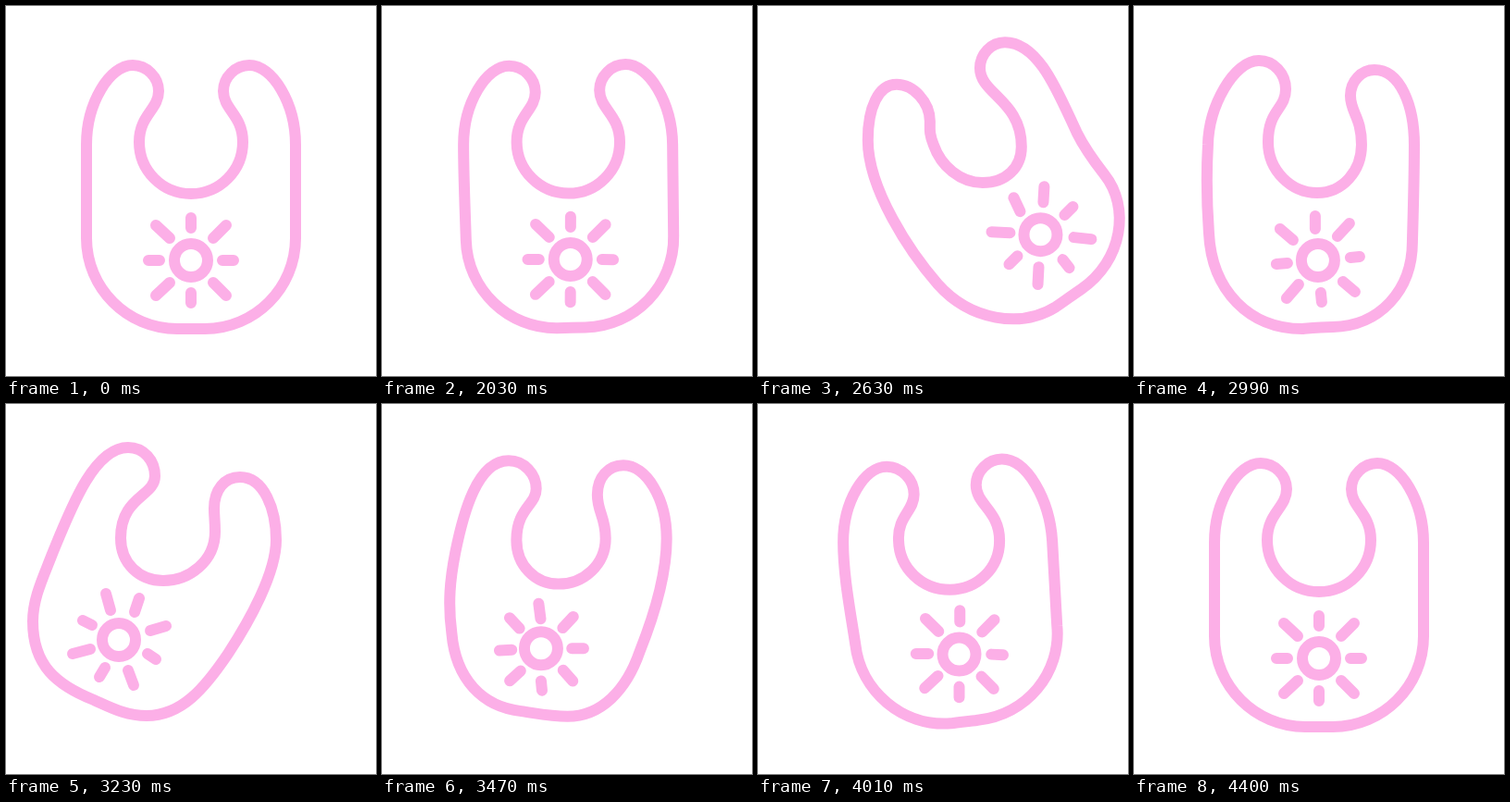
An HTML page without scripts that plays this animation: 400x400 px, repeating every 4430 ms.

```html
<!DOCTYPE html>
<html lang="en">
<head>
<meta charset="utf-8">
<title>Swinging bib</title>
<style>
  html, body { margin: 0; width: 100%; height: 100%; overflow: hidden; background: #fff; }
  svg { display: block; width: 100%; height: 100%; }

  :root {
    --ease-in: cubic-bezier(.47, 0, .745, .715);
    --ease-out: cubic-bezier(.39, .575, .565, 1);
    --ease-both: cubic-bezier(.37, 0, .63, 1);
  }

  .bib {
    fill: none;
    stroke: #fcafe7;
    stroke-width: 12;
    stroke-linecap: round;
    stroke-linejoin: round;
    animation: swing 4430ms infinite;
  }

  /* Each pose: bib outline, sun ring, then eight rays clockwise from the top. */
  @keyframes swing {
    0%, 45.1%, 99.3%, 100% { /* rest */
      animation-timing-function: var(--ease-both);
      d: path("M87,150C87,105 112,64 137,64C152,64 165,77 165,92C165,112 144,118 144,147\
C144,178 169,203 200,203C231,203 256,178 256,147C256,118 235,112 235,92\
C235,77 248,64 263,64C288,64 313,105 313,150C313,183 313,217 313,251\
C313,305 269,349 215,349C205,349 195,349 185,349C131,349 87,305 87,251C87,217 87,183 87,150Z\
M182,275a18,18 0 1 0 36,0a18,18 0 1 0 -36,0Z\
M200,229L200,240M238,237L224,251M246,275L234,275M238,313L224,299\
M200,321L200,310M162,313L177,299M154,275L166,275M162,237L177,251");
    }
    59.3% { /* far right */
      animation-timing-function: var(--ease-in);
      d: path("M119,145C119,110 130,85 150,85C168,85 186,104 186,125C186,133 185,138 190,150\
C198,173 219,191 243,191C268,191 285,175 285,152C285,102 240,95 240,67\
C240,52 252,39 267,39C304,39 325,95 345,137C354,155 364,168 375,182\
C403,217 395,275 350,306C341,312 332,319 323,325C285,349 230,340 195,301C165,267 119,198 119,145Z\
M288,247a18,18 0 1 0 36,0a18,18 0 1 0 -36,0Z\
M310,195L309,212M341,217L332,226M361,252L342,250M337,283L330,274\
M303,301L304,282M272,279L281,270M253,244L273,245M277,207L284,222");
    }
    67.5% { /* passing the middle, leftward */
      animation-timing-function: var(--ease-out);
      d: path("M80,150C81,108 108,59 135,59C151,59 164,73 164,90C164,112 145,112 145,147\
C145,178 170,202 198,202C226,202 246,178 246,150C246,120 234,115 234,97\
C234,81 246,69 260,69C288,69 303,108 303,150C303,185 302,220 301,255\
C301,308 265,346 215,347C203,347 193,348 182,349C125,349 84,308 81,245C79,217 78,183 80,150Z\
M181,275a18,18 0 1 0 36,0a18,18 0 1 0 -36,0Z\
M196,227L196,241M233,235L220,249M244,271L234,272M239,309L226,298\
M203,320L202,310M165,316L178,301M154,279L166,278M158,241L172,253");
    }
    72.9%, 74.9% { /* far left */
      animation-timing-function: var(--ease-in);
      d: path("M50,162C70,113 95,47 132,47C149,47 161,61 161,78C161,100 124,100 124,145\
C124,172 144,191 170,191C198,191 226,170 226,138C226,127 225,121 225,113\
C225,93 236,79 253,79C279,79 292,114 292,147C292,183 263,235 240,270\
C215,307 190,337 152,337C130,337 115,329 95,320C55,304 29,283 29,235C29,210 40,188 50,162Z\
M104,255a18,18 0 1 0 36,0a18,18 0 1 0 -36,0Z\
M108,205L113,223M144,210L139,225M173,240L156,245M162,276L153,270\
M138,304L132,288M101,295L107,285M72,270L91,265M83,234L93,239");
    }
    83.07% { /* passing the middle, rightward */
      animation-timing-function: var(--ease-out);
      d: path("M91,160C95,120 106,67 139,67C156,67 169,82 169,97C169,113 154,118 154,148\
C154,175 174,196 199,196C226,196 248,175 248,148C248,120 236,115 236,92\
C236,74 248,61 264,61C288,61 314,97 314,145C314,190 304,233 294,267\
C284,310 256,338 220,338C204,338 190,337 173,337C130,337 100,303 94,253C88,217 87,190 91,160Z\
M174,268a18,18 0 1 0 36,0a18,18 0 1 0 -36,0Z\
M194,220L195,236M232,238L218,249M236,274L225,272M224,309L213,295\
M187,312L188,304M153,301L167,290M149,265L160,266M160,230L171,244");
    }
    88.5% { /* small swing right */
      animation-timing-function: var(--ease-both);
      d: path("M94,149C94,106 116,69 140,69C156,69 170,83 170,100C170,117 153,123 155,148\
C156,177 180,200 210,200C240,200 263,177 263,148C263,114 236,108 236,86\
C236,71 249,58 264,58C292,58 316,103 320,147C322,177 325,206 327,235\
C334,285 298,332 246,339C236,341 227,342 217,344C166,349 120,313 112,263C105,229 94,186 94,149Z\
M206,269a18,18 0 1 0 36,0a18,18 0 1 0 -36,0Z\
M225,221L225,234M262,232L249,245M272,270L259,269M261,306L248,293\
M224,316L224,304M187,305L201,292M177,268L191,268M188,230L202,244");
    }
  }

  .drift { animation: drift 4430ms infinite ease-in-out; }
  @keyframes drift {
    0%, 72.9%, 74.9%, 100% { transform: none; }
    73.9% { transform: translateX(-2px); }
  }
</style>
</head>
<body>
<svg viewBox="0 0 400 400">
  <g class="drift"><path class="bib"/></g>
</svg>
</body>
</html>
```
